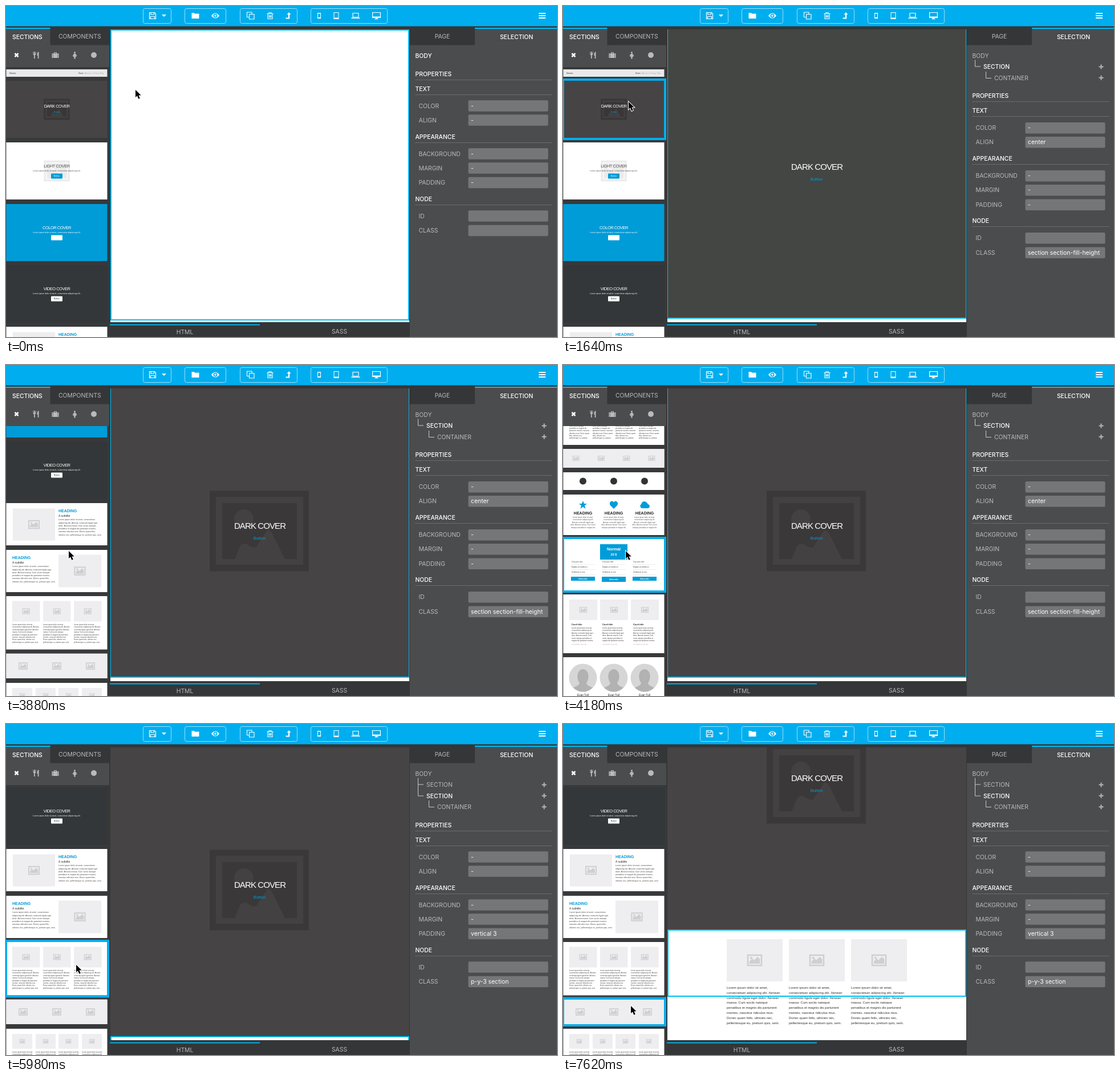
Recreate the animation shown at these times as an HTML page with a canvas. Size 966 px wide and 580 px high, loop 8000 ms.

```html
<!DOCTYPE html>
<html lang="en">
<head>
<meta charset="utf-8">
<title>Page builder</title>
<style>
html, body { margin: 0; width: 100%; height: 100%; overflow: hidden; background: #343637; }
canvas { display: block; }
</style>
</head>
<body>
<canvas id="stage" width="966" height="580"></canvas>
<script>
const c = document.getElementById('stage').getContext('2d');
const LOOP = 8000;
const BLUE = '#00aeef', LINE = '#00bdf2', ACCENT = '#009cd8', PANEL = '#4b4c4e', DARK = '#343637', MUTED = '#b9babb';
const UI = 'Inter, sans-serif', WEB = '"Liberation Sans", Arial, sans-serif';
const LOREM = ('Lorem ipsum dolor sit amet, consectetuer adipiscing elit. Aenean commodo ligula eget dolor. ' +
  'Aenean massa. Cum sociis natoque penatibus et magnis dis parturient montes, nascetur ridiculus mus. ' +
  'Donec quam felis, ultricies nec, pellentesque eu, pretium quis, sem.').split(' ');

// ---- Timeline: rows of [time, ...values] ----
const POINTER = [[0, 227, 147], [150, 236, 152], [300, 254, 165], [450, 190, 180], [600, 128, 170], [750, 115, 168],
  [2090, 115, 168], [2240, 150, 190], [2390, 300, 260], [2540, 410, 296], [2690, 440, 300], [3140, 440, 300],
  [3290, 164, 225], [3440, 120, 300], [3590, 110, 326], [5080, 110, 326], [5230, 117, 380], [5380, 123, 422],
  [6280, 123, 422], [7030, 124, 436], [7330, 120, 470], [7480, 119, 490], [7620, 119, 494]];
const LIST = [[3440, 0], [3590, 70], [3740, 320], [3890, 600], [4030, 780], [4180, 829], [4330, 829], [4480, 750],
  [4630, 560], [4780, 400], [4930, 345], [5080, 343]];
const PAGE = [[5980, 0], [6130, 110], [6280, 187]];
const HOVER = [[0, -1], [600, 1], [2390, -1], [4180, 13], [4480, -1], [5230, 7], [7330, 8]];

function tween(keys, t) {
  const i = keys.findIndex(k => k[0] > t);
  if (i === 0) return keys[0].slice(1);
  if (i < 0) return keys[keys.length - 1].slice(1);
  const a = keys[i - 1], b = keys[i], p = (t - a[0]) / (b[0] - a[0]);
  return a.slice(1).map((v, j) => v + (b[j + 1] - v) * p);
}
const hold = (keys, t) => keys.filter(k => k[0] <= t).pop()[1];
// The screen refreshes about every 150 ms.
function tick(t) {
  const off = t < 1600 ? 0 : t < 4000 ? 140 : t < 7600 ? 130 : 120;
  return Math.floor((t - off) / 150) * 150 + off;
}

// ---- Drawing helpers ----
function rect(x, y, w, h, color) { c.fillStyle = color; c.fillRect(x, y, w, h); }
function round(x, y, w, h, r, color) { c.fillStyle = color; c.beginPath(); c.roundRect(x, y, w, h, r); c.fill(); }
function box(x, y, w, h, color, lw) { c.strokeStyle = color; c.lineWidth = lw; c.strokeRect(x, y, w, h); }
function disc(x, y, r, color) { c.fillStyle = color; c.beginPath(); c.arc(x, y, r, 0, 7); c.fill(); }
function path(d, x, y, color, lw, scale = 1) {
  c.save();
  c.translate(x, y);
  c.scale(scale, scale);
  const p = new Path2D(d);
  if (lw) { c.strokeStyle = color; c.lineWidth = lw; c.stroke(p); }
  else { c.fillStyle = color; c.fill(p, 'evenodd'); }
  c.restore();
}
// y is the middle of the capitals
function text(s, x, y, px, color, { bold = 400, align = 'left', font = WEB, gap = 0 } = {}) {
  c.font = `${bold} ${px}px ${font}`;
  c.letterSpacing = gap + 'px';
  c.textAlign = align;
  c.fillStyle = color;
  c.fillText(s, x, y + px * 0.36);
  c.letterSpacing = '0px';
}
const ui = (s, x, y, color, opt) => text(s, x, y, 10.4, color, { font: UI, ...opt });
const mid = (s, x, y, px, color, opt) => text(s, x, y, px, color, { align: 'center', ...opt });
function para(x, y, w, px, max = 99, color = '#444', align = 'left') {
  c.font = `400 ${px}px ${WEB}`;
  let line = '', n = 0;
  const flush = () => { if (n < max) text(line, x, y + n * px * 1.5, px, color, { align }); n++; };
  for (const word of LOREM) {
    const next = line ? line + ' ' + word : word;
    if (line && c.measureText(next).width > w) { flush(); line = word; } else line = next;
  }
  flush();
}
function clip(x, y, w, h, draw) {
  c.save();
  c.beginPath();
  c.rect(x, y, w, h);
  c.clip();
  draw();
  c.restore();
}
function picture(x, y, w, h, k = 0.27) {
  rect(x, y, w, h, '#eeedef');
  const s = w * k / 26;
  path('M-13-10H13V10H-13ZM-10.5-7.5V7.5H10.5V-7.5ZM-9 6V2L-4-3L-1 0L5-6L9-2V6ZM-8-4a2 2 0 1 0 4 0a2 2 0 1 0-4 0',
    x + w / 2, y + h / 2, '#cfced0', 0, s);
}
function strip(n, h) {
  rect(0.5, 0, 177, h, '#eeedef');
  for (let i = 0; i < n; i++) picture(0.5 + i * 177 / n, 0, 177 / n, h);
}
function backdrop(x, y, scale, dark, light) {
  c.save();
  c.translate(x, y);
  c.scale(scale, scale);
  rect(-87, -70.5, 174, 141, dark);
  rect(-76, -60, 153, 119, light);
  rect(-65, -49, 131, 98, dark);
  disc(-27, -21, 17, light);
  path('M-43 49L-34 27Q-26 17-16 27L-6 29L13 0Q18-4 23 5L45 49Z', 0, 0, light);
  c.restore();
}

// ---- Section thumbnails ----
function cover(title, bg, ink, button, label, art) {
  rect(0.5, 0, 177, 101, bg);
  if (art) backdrop(89, 50, 0.26, ...art);
  mid(title, 89, button ? 41 : 44.5, 7.5, ink, { gap: -0.5 });
  if (!button) return mid('Button', 89, 55, 3.7, ACCENT);
  mid('Lorem ipsum dolor sit amet, consectetur adipisicing elit.', 89, 49.3, 3.4, ink);
  round(79, 54.5, 20, 9, 1, button);
  mid('Button', 89, 59, 3.7, label);
}
function article(x) {
  text('HEADING', x, 13.5, 7, ACCENT, { bold: 700 });
  text('A subtitle', x, 22, 4.9, '#222');
  para(x, 29, 77, 3.5);
}
const thirds = [35, 89, 143], quarters = [11, 52, 92, 133];
const white = h => rect(0.5, 0, 177, h, '#fff');
const CELLS = [
  [111, 13, () => {
    rect(0.5, 0, 177, 13, '#e9e9e9');
    text('Navbar', 6, 6.5, 3.6, '#333');
    text('Home', 127, 6.5, 3.3, '#333');
    text('About us  Pricing  Blog', 138, 6.5, 3.3, '#aaa');
  }],
  [131, 100, () => cover('DARK COVER', '#474445', '#fff', '', '', ['#383637', '#424041'])],
  [239, 100, () => cover('LIGHT COVER', '#fff', '#555', ACCENT, '#fff', ['#ebebeb', '#f5f5f5'])],
  [347, 100, () => cover('COLOR COVER', ACCENT, '#fff', '#fff', '#fff')],
  [454, 101, () => cover('VIDEO COVER', '#33373a', '#fff', '#fff', '#333')],
  [562, 74, () => { white(74); picture(12, 9.5, 74, 56); article(92); }],
  [644, 74, () => { white(74); picture(92, 8.5, 75, 57); article(11); }],
  [725, 93.5, () => { white(94); thirds.forEach(x => { picture(x - 24, 8.5, 48.5, 36); para(x - 24, 50, 48.5, 2.92); }); }],
  [825.5, 43.5, () => strip(3, 44)],
  [877, 92, () => { white(92); quarters.forEach(x => { picture(x, 9, 35, 26); para(x, 41, 36.5, 2.92, 10); }); }],
  [976, 33, () => strip(4, 33)],
  [1017, 31, () => { white(31); thirds.forEach(x => disc(x, 15.5, 6, '#333')); }],
  [1056, 71, () => {
    white(71);
    path('M0-7L2-2L7-2L3 1.3L4.5 7L0 3.6L-4.5 7L-3 1.3L-7-2L-2-2Z', 35, 18, ACCENT);
    path('M0 7L-6 1C-9-3-5-8-1.5-6L0-4.5L1.5-6C5-8 9-3 6 1Z', 89, 18, ACCENT);
    path('M-4.500 6A4 4 0 0 1-5.500-1.500A5 5 0 0 1 3.500-4A3 3 0 0 1 5.500-1A3.500 3.500 0 0 1 5 6Z', 143, 18, ACCENT);
    thirds.forEach(x => {
      mid('HEADING', x, 32, 7, '#222', { bold: 700 });
      para(x, 40, 46, 2.95, 5, '#555', 'center');
    });
  }],
  [1134, 90, () => {
    white(90);
    rect(65, 9, 48, 27, ACCENT);
    mid('Normal', 89, 17, 7, '#fff', { bold: 700 });
    mid('20 $', 89, 27, 5.6, '#fff', { bold: 700 });
    thirds.forEach((x, i) => {
      ['Cras justo odio', 'Dapibus ac facilisis in', 'Vestibulum at eros'].forEach((s, j) => {
        text(s, x - 20, 40 + j * 9, 2.9, '#444');
        rect(x - 21, 44.5 + j * 9, 42, 0.5, '#ddd');
      });
      rect(x - 21, 66, 42, i === 1 ? 9 : 7, ACCENT);
      mid('Subscribe', x, i === 1 ? 70.5 : 69.5, 3.3, '#fff', { bold: 700 });
    });
  }],
  [1231, 103, () => {
    white(103);
    thirds.forEach(x => {
      picture(x - 24, 9, 49, 36);
      text('Card title', x - 20, 52, 4.3, '#222', { bold: 700 });
      para(x - 20, 59, 42, 2.92, 6);
      text('Last updated 3 mins ago', x - 20, 87, 2.4, '#777');
    });
  }],
  [1341, 92, () => {
    white(92);
    thirds.forEach(x => {
      disc(x, 36, 24.5, '#d6d6d6');
      c.save();
      c.beginPath();
      c.arc(x, 36, 24.5, 0, 7);
      c.clip();
      path('M-23 25C-22 15-7 17-6 9C-12 1-11-14 0-15C11-14 12 1 6 9C7 17 22 15 23 25Z', x, 36, '#b2b2b2');
      c.restore();
      mid('Evan Tull', x, 66, 4.8, '#222');
      para(x, 74, 46, 2.92, 3, '#555', 'center');
    });
  }]
];

function sidebar(t) {
  const [scroll] = tween(LIST, t), hover = hold(HOVER, t);
  rect(0, 38, 181, 69, PANEL);
  rect(77.5, 38, 103.5, 30.5, DARK);
  rect(0, 38, 77.5, 2, LINE);
  ui('SECTIONS', 11, 54, '#fff', { bold: 500 });
  ui('COMPONENTS', 92, 53, MUTED);
  path('M-3-3L3 3M3-3L-3 3', 18.5, 86, '#fff', 2.6);
  path('M-5-6V-2Q-5 0-3.500 0V6H-1.700V0Q0 0 0-2V-6H-.7V-2.500H-1.600V-6H-3.400V-2.500H-4.300V-6ZM5-6Q2-5 2-1V1H3.200V6H5Z', 52.5, 86, MUTED);
  path('M-6-3H-2.500V-5H2.500V-3H6V5H-6ZM-1.500-4V-3H1.500V-4ZM-4.500-3V5H-4V-3ZM4-3V5H4.500V-3Z', 86.5, 86, MUTED);
  path('M-1.500-4.500a1.500 1.500 0 1 0 3 0a1.500 1.500 0 1 0-3 0M-1.500-2.500H1.500L4 1.500L3 2L1.500 0L3 3H1.200V6.500H-1.200V3H-3L-1.500 0L-3 2L-4 1.500Z', 120.500, 86, MUTED);
  disc(154, 86, 5, MUTED);
  clip(0, 107, 182, 473, () => {
    rect(0, 107, 182, 473, '#37393a');
    CELLS.forEach(([top, h, draw], i) => {
      const y = top - scroll;
      if (y > 580 || y + h < 107) return;
      c.save();
      c.translate(0, y);
      clip(0, 0, 178, h, draw);
      if (i === hover) box(0, -2, 179, h + 4, BLUE, 4);
      c.restore();
    });
  });
}

function page(t) {
  const [scroll] = tween(PAGE, t);
  const hovered = t >= 2390 && t < 3440;
  rect(183, 41, 524, 513, '#fff');
  if (t < 1640) return box(184, 42, 522, 508, LINE, 2);
  const art = t >= 1790, added = t >= 5980;
  c.save();
  c.translate(0, -scroll);
  rect(183, 41, 524, 506, art ? '#474445' : '#444643');
  if (art) backdrop(444, 291, 1, '#3a3839', '#434142');
  mid('DARK COVER', 445, 282, 15, '#fff', { gap: -0.9 });
  mid('Button', 444.5, 303, 7.5, ACCENT);
  if (hovered) {
    c.setLineDash([2, 1]);
    box(394, 273, 102, 39, '#8fd3dc', 1);
    c.setLineDash([]);
  }
  if (added) {
    rect(183, 547, 524, 194, '#fff');
    [287, 396, 505].forEach(x => {
      if (t >= 6130) picture(x, 564, 98, 74);
      para(x, 649, 97, 5.85, 99, '#333');
    });
    box(184, 548, 522, 116, LINE, 2);
  } else {
    rect(183, 41, 1, 506, LINE);
    rect(706, 41, 1, 506, LINE);
    rect(183, 546, 524, hovered ? 3 : 2, LINE);
  }
  c.restore();
  if (hovered) rect(704.5, 45, 2.5, 502, 'rgba(40,42,44,.6)');
  if (t >= 6130 && t < 7180) rect(704, 182 - (187 - scroll) * 0.73, 3, 371, '#343536');
}

function inspector(t) {
  const rows = t < 1640 ? 0 : t < 5980 ? 2 : 3;
  rect(708, 38, 258, 542, PANEL);
  rect(708, 38, 114, 30.5, DARK);
  rect(822, 38, 144, 2, LINE);
  ui('PAGE', 765, 53.5, MUTED, { align: 'center' });
  ui('SELECTION', 895, 54.5, '#fff', { align: 'center', bold: 500 });
  ui('BODY', 717.5, 87, rows ? MUTED : '#fff', { bold: rows ? 400 : 500 });
  for (let i = 1; i <= rows; i++) {
    const y = 87 + i * 19.4, leaf = i === rows, x = leaf ? 756 : 737, active = i === rows - 1;
    ui(leaf ? 'CONTAINER' : 'SECTION', x, y, active ? '#fff' : MUTED, { bold: active ? 500 : 400 });
    path('M-14.500-11V.5H-5', x, Math.round(y) - (leaf ? 0 : 0.5), '#c8c9ca', 1);
    if (i === 2 && !leaf) path('M-14.500-20V0', x, Math.round(y), '#c8c9ca', 1);
    path('M-4 0H4M0-4V4', 943.5, y, '#b4b5b6', 2);
  }
  const base = 119 + rows * 19.35;
  const head = (s, dy) => {
    ui(s, 717.5, base + dy, '#fff', { bold: 500 });
    c.setLineDash([1, 1]);
    path('M0 0H240', 718, Math.round(base + dy + 9.5) + 0.5, '#8a8b8d', 1);
    c.setLineDash([]);
  };
  const field = (s, dy, value) => {
    const y = base + dy;
    ui(s, 723.5, y, MUTED);
    round(810.5, y - 9.7, 140, 19.4, 2, '#757677');
    ui(value, 815, y, '#fff');
  };
  head('PROPERTIES', 0);
  head('TEXT', 26);
  field('COLOR', 56, '-');
  field('ALIGN', 81, rows === 2 ? 'center' : '-');
  head('APPEARANCE', 110);
  field('BACKGROUND', 140, '-');
  field('MARGIN', 165, '-');
  field('PADDING', 190.5, rows === 3 ? 'vertical 3' : '-');
  head('NODE', 219);
  field('ID', 249, '');
  field('CLASS', 274.5, ['', '', 'section section-fill-height', 'p-y-3 section'][rows]);
}

function toolbar() {
  rect(0, 0, 966, 35.5, BLUE);
  c.strokeStyle = '#9adff8';
  c.lineWidth = 1;
  [[240, 50], [313, 73], [410, 101], [534, 135]].forEach(([x, w]) => {
    c.beginPath();
    c.roundRect(x + 0.5, 4.5, w - 1, 26, 3);
    c.stroke();
  });
  const icon = (d, x, lw) => path(d, x, 17, '#fff', lw);
  icon('M-5.500-5.500H3.500L5.500-3.500V5.500H-5.500ZM-3-5.500V-2H2.500V-5.500M-3.500 5.500V1.500H3.500V5.500', 257, 1.2);
  icon('M-4-2H4L0 2Z', 277);
  icon('M-6.500-5H-2L-1-3.500H6.500V5H-6.500Z', 332);
  icon('M-7 0Q0-9 7 0Q0 9-7 0ZM-3.500 0a3.500 3.500 0 1 0 7 0a3.500 3.500 0 1 0-7 0M-1.800 0a1.800 1.800 0 1 1 3.600 0a1.800 1.800 0 1 1-3.600 0', 367);
  icon('M-2.500-2.500H6V6H-2.500ZM-2.500 2.500H-6.500V-6H2V-2.500', 429, 1.1);
  icon('M-5.500-3.500H5.500M-2-3.500V-5.500H2V-3.500M-4-3.500V5.500H4V-3.500M-1.700-1V3.500M0-1V3.500M1.700-1V3.500', 463, 1.1);
  icon('M1-6L4.500-2H2.200V5.500H-4L-5 3.500H-.2V-2H-2.500Z', 495);
  icon('M-3-5H3V5H-3ZM-2-3.500V3H2V-3.500Z', 549);
  icon('M-4.500-6H4.500V6H-4.500ZM-3.500-5V3.500H3.500V-5Z', 579);
  icon('M-5.500-5H5.500V3H-5.500ZM-4.300-4V2H4.300V-4ZM-7.500 3.500H7.500V5H-7.500Z', 613);
  icon('M-7.500-6H7.500V4H-7.500ZM-6.300-5V1.500H6.300V-5ZM-1.500 4H1.500V5H3V6.200H-3V5H-1.500Z', 649.5);
  icon('M-6-5H6V-3H-6ZM-6-1H6V1H-6ZM-6 3H6V5H-6Z', 940);
}

function draw(t) {
  rect(0, 0, 966, 580, DARK);
  toolbar();
  sidebar(t);
  clip(183, 41, 524, 513, () => page(t));
  inspector(t);
  rect(182, 557.6, 263, 2, BLUE);
  ui('HTML', 313.5, 571.5, MUTED, { align: 'center' });
  ui('SASS', 584.5, 570.5, MUTED, { align: 'center' });
  const [x, y] = tween(POINTER, t), arrow = 'M0 0V13L3 10.300L5.300 15.800L7.800 14.700L5.500 9.400H9.700Z';
  path(arrow, x, y, '#fff', 2);
  path(arrow, x, y, '#000');
}

const start = performance.now();
function frame() {
  draw(Math.max(0, tick((performance.now() - start) % LOOP)));
  requestAnimationFrame(frame);
}
frame();
</script>
</body>
</html>
```
